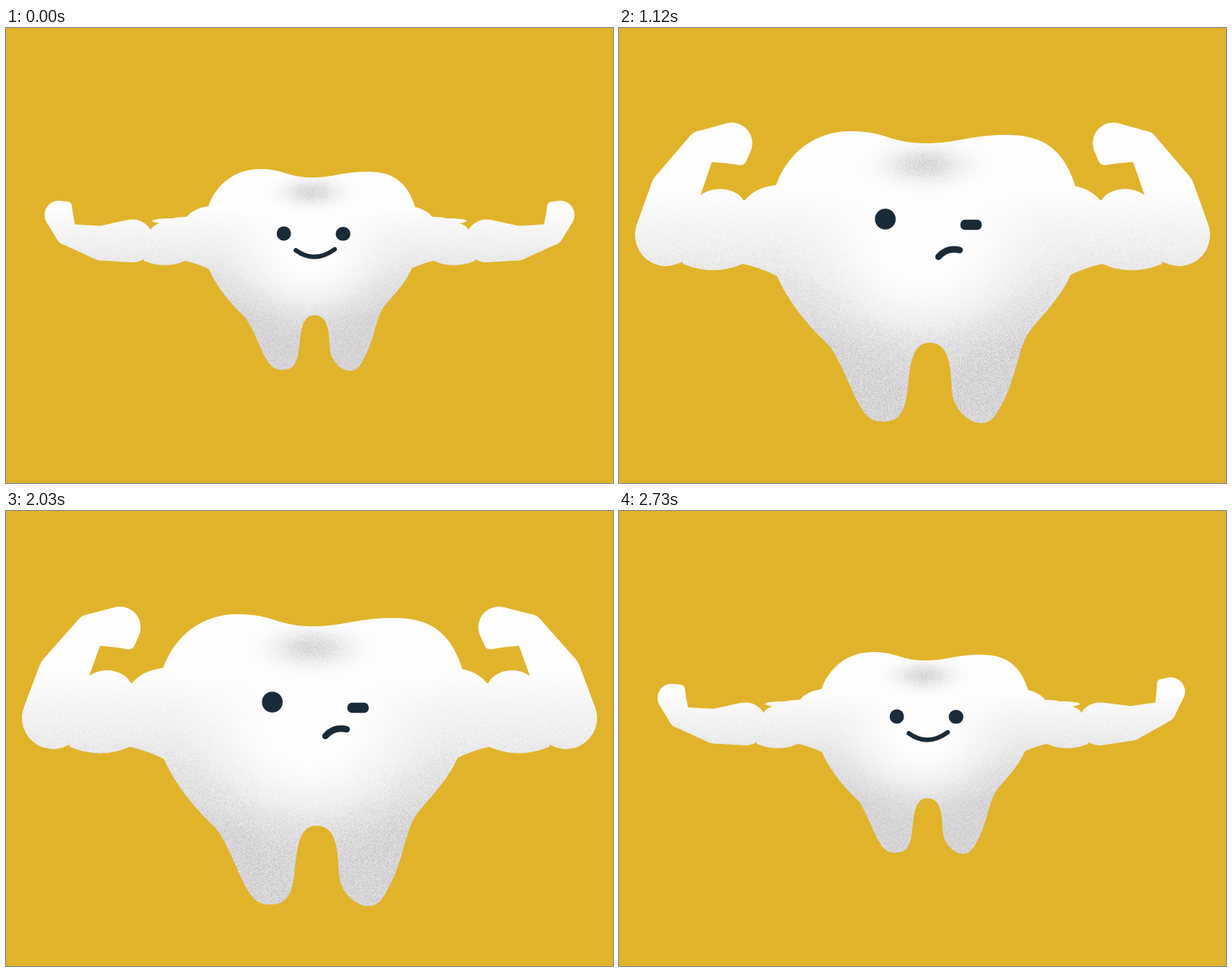
Animation, 800 px wide and 600 px high, one loop 2800 ms. Source, as an HTML page with a canvas:

```html
<!DOCTYPE html>
<html>
<head>
<meta charset="utf-8">
<title>Flexing tooth</title>
<style>
html, body { margin: 0; width: 100%; height: 100%; overflow: hidden; background: #e0b32b; }
canvas { display: block; }
</style>
</head>
<body>
<canvas id="stage" width="800" height="600"></canvas>
<script>
const LOOP = 2800, STEP = 70, INK = '#1a2b38';
const ctx = document.getElementById('stage').getContext('2d');
const clamp = v => Math.max(0, Math.min(1, v));
const smooth = v => (v = clamp(v), v * v * (3 - 2 * v));
const mix = (a, b, k) => a + (b - a) * k;
const ramp = (t, start, duration) => smooth((t - start) / duration);

// Motion: swell, swing up, ring out, hold, drop
const REST = 107, PEAK = 127;
const size = t => mix(.691, 1, ramp(t, 0, 510) - ramp(t, 2207, 255));
const stern = t => ramp(t, 100, 180) - ramp(t, 2100, 273);
const wink = t => ramp(t, 100, 140) - ramp(t, 2310, 140);
const lag = t => 5 * ramp(t, 2590, 140);
function swing(t) {
  const late = t - 350;
  if (late < 0) return PEAK * ramp(t, 0, 350);
  const ring = (PEAK - REST) * Math.exp(-late / 260) * Math.cos(2 * Math.PI * late / 490);
  return (REST + ring) * (1 - ramp(t, 2300, 280));
}
const biceps = t => 5 + 18 * clamp(swing(t) / REST) + 14 * Math.exp(-(((t - 1750) / 200) ** 2));

const body = new Path2D(`M207 207C222 165 258 136 305 136S358 152 403 152S460 141 512 141
  S587 165 601 207Q618 270 594 328C580 360 548 388 538 405S522 460 510 485S492 521 477 521
  S441 504 439 480S439 415 409 415S384 468 378 492S362 519 346 519S322 507 314 492
  S288 430 276 418S230 375 208 327Q190 270 207 207Z`);
const upperArm = new Path2D(`M225 206L207 207Q180 210 166 227Q130 226 101 246
  Q76 280 84 311Q125 328 163 311Q186 316 208 327L240 340Z`);

// Forearm links: length, angle from the stretched line, end radius
const ELBOW = { x: 62, y: 273, r: 41 };
const links = [
  { length: 58, angle: -4, r: 33 },
  { length: 70, angle: 14, r: 20 },
  { length: 40, angle: 69, r: 27 },
  { length: 23, angle: 135, r: 9 }
];

// Two circles and the band between them
function taper(a, b) {
  const dx = b.x - a.x, dy = b.y - a.y;
  const dir = Math.atan2(dy, dx), lean = Math.acos((a.r - b.r) / Math.hypot(dx, dy));
  ctx.beginPath();
  ctx.arc(a.x, a.y, a.r, dir + lean, dir - lean + 2 * Math.PI);
  ctx.arc(b.x, b.y, b.r, dir - lean, dir + lean);
  ctx.fill();
}

function drawArm(t, extra) {
  ctx.fill(upperArm);
  ctx.beginPath();
  ctx.ellipse(133, 235, 33, biceps(t), 0, 0, 7);
  ctx.fill();
  let joint = ELBOW;
  for (const { length, angle, r } of links) {
    const a = (angle + swing(t) + extra - 6) * Math.PI / 180 + .1;
    const next = { x: joint.x - length * Math.cos(a), y: joint.y - length * Math.sin(a), r };
    taper(joint, next);
    joint = next;
  }
}

// Grainy enamel: grey towards the roots, a soft dent on top
function enamel(seed) {
  const tile = document.createElement('canvas');
  tile.width = 800;
  tile.height = 600;
  const c = tile.getContext('2d'), img = c.createImageData(800, 600);
  for (let i = 0; i < 480000; i++) {
    seed = (Math.imul(seed, 1664525) + 1013904223) >>> 0;
    const x = i % 800, y = Math.floor(i / 800);
    const low = clamp((y - 210) / 210) * smooth((Math.hypot(x - 400, y - 280) - 30) / 170);
    const dent = Math.exp(-(((x - 403) / 48) ** 2) - ((y - 180) / 22) ** 2);
    const dark = (40 * low + 35 * dent) * (.6 + .8 * seed / 2 ** 32);
    img.data.set([254 - dark, 254 - dark * 1.04, 254 - dark, 255], i * 4);
  }
  c.putImageData(img, 0, 0);
  return ctx.createPattern(tile, 'repeat');
}
const enamels = [7, 1234, 98765].map(enamel);

function drawFace(t) {
  const mood = stern(t), shut = wink(t);
  ctx.fillStyle = ctx.strokeStyle = INK;
  ctx.beginPath();
  ctx.arc(351, mix(259, 252, mood), 13.7, 0, 7);
  ctx.fill();
  const w = 28, h = mix(26.5, 13.5, shut);
  ctx.beginPath();
  ctx.roundRect(464 - w / 2, 259.5 - h / 2, w, h, mix(13.2, 6, shut));
  ctx.fill();

  const frownY = 308 - t * .0055;
  const blend = (smile, frown) => mix(smile, frown, mood);
  ctx.lineWidth = 8.5;
  ctx.lineCap = 'round';
  ctx.beginPath();
  ctx.moveTo(blend(374, 421), blend(291, frownY));
  ctx.quadraticCurveTo(blend(409, 432), blend(317, frownY - 13), blend(448, 449), blend(289, frownY - 9));
  ctx.stroke();
}

function draw(now) {
  const step = Math.floor(now % LOOP / STEP), t = step * STEP, s = size(t);
  ctx.fillStyle = '#e0b32b';
  ctx.fillRect(0, 0, 800, 600);
  ctx.save();
  ctx.translate(400, 298);
  ctx.scale(s, s);
  ctx.translate(-400, -298);
  ctx.fillStyle = enamels[step % 3];
  drawArm(t, 0);
  ctx.save();
  ctx.translate(800, 0);
  ctx.scale(-1, 1);
  drawArm(t, lag(t));
  ctx.restore();
  ctx.fill(body);
  drawFace(t);
  ctx.restore();
  requestAnimationFrame(draw);
}
requestAnimationFrame(draw);
</script>
</body>
</html>
```
